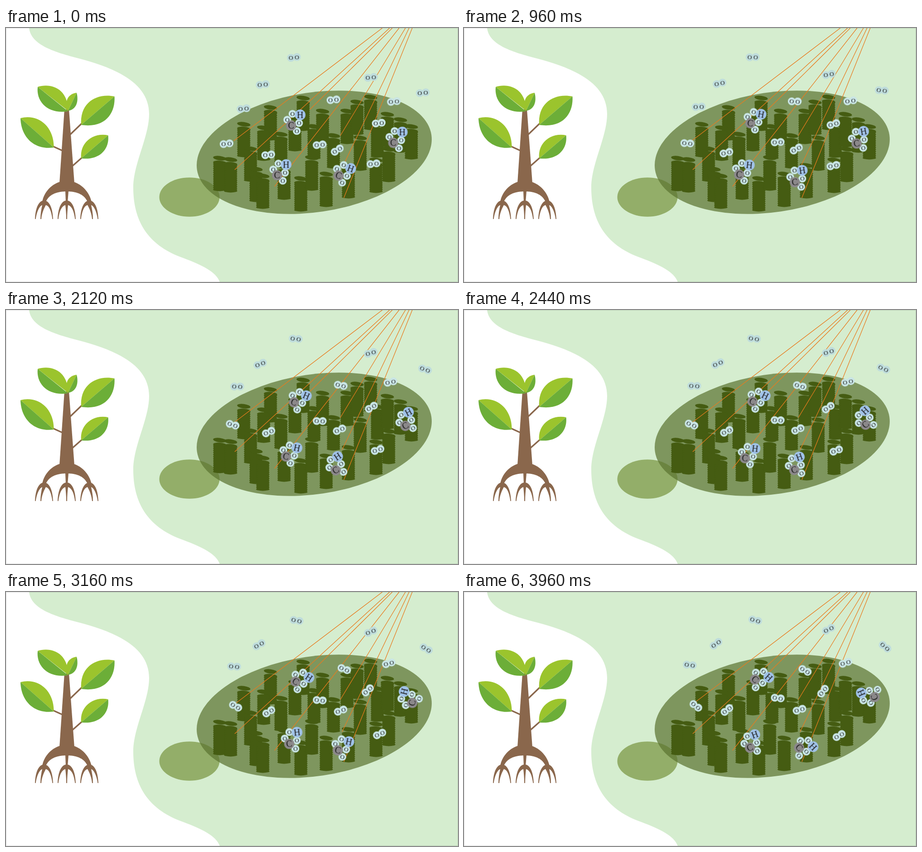
These frames come from a looping animation (998x561 px, 4 s). An HTML page:

```html
<!DOCTYPE html>
<html lang="en">
<head>
<meta charset="utf-8">
<title>Photosynthesis</title>
<style>
html, body { margin: 0; width: 100%; height: 100%; overflow: hidden; background: #d5edcf; }
svg { display: block; width: 100%; height: 100%; }
text { font-family: "Liberation Serif", "Times New Roman", serif; text-anchor: middle; fill: #1d1d1d; }
.light { fill: #9bc42d; }
.dark { fill: #6cae38; }
.wood { fill: #8a674c; }
.twig { stroke: #8a674c; stroke-width: 3.4; }
.rays { stroke: #e87b1e; stroke-width: 1.25; }
.drift { animation: drift 4s linear infinite; }
.bend { animation: bend 4s linear infinite; }
@keyframes drift {
  0% { transform: translate(var(--x0), var(--y0)) rotate(var(--r0)); }
  99%, 100% { transform: translate(var(--x1), var(--y1)) rotate(var(--r1)); }
}
@keyframes bend {
  0% { transform: translate(var(--x0), var(--y0)) rotate(var(--r0)); }
  50% { transform: translate(var(--x1), var(--y1)) rotate(var(--r1)); }
  99%, 100% { transform: translate(var(--x2), var(--y2)) rotate(var(--r2)); }
}
</style>
</head>
<body>
<svg viewBox="0 0 998 561" preserveAspectRatio="none">
  <defs>
    <g id="granum" fill="#455c12"></g>
    <path id="sideRoot" d="M64 422C65 398 72 381 84 381S103 398 104 422H102.400C100 405 96 393 88 391C83 400 79 410 78 422H76C76 410 78 400 80 391C73 394 68 406 65.600 422Z"/>
  </defs>
  <rect width="998" height="561" fill="#d5edcf"/>
  <path fill="#fff" d="M0 0H51C55 38 110 54 160 67C240 88 316 120 316 190C316 240 281 300 281 352C281 425 312 478 386 506C430 522 464 538 472 561H0Z"/>

  <path class="twig" d="M142 235L167 211M147 304.500L168 286M104 261.500L126 271.500"/>
  <g class="wood">
    <path d="M129 180H139L151 343H118Z"/>
    <path d="M118 340C100 346 84 362 80 384H88C95 368 110 362 131 361L132 385H136L138 361C158 362 173 368 180 384H189C184 362 168 346 150 340Z"/>
    <use href="#sideRoot"/>
    <use href="#sideRoot" transform="matrix(-1 0 0 1 268 0)"/>
    <path d="M114 422C115 398 122 381 134 381S153 398 154 422H152.400C150 405 146 394 137 391C136 400 135 410 135 422H133C133 410 132 400 131 391C122 394 118 405 115.600 422Z"/>
  </g>
  <path class="light" d="M70 130C100 121 137 134 137 183Z"/>
  <path class="dark" d="M70 130C66 164 94 191 137 184Z"/>
  <path class="light" d="M156 143C140 145 127 158 137 183Z"/>
  <path class="dark" d="M156 143C161 163 155 180 137 183Z"/>
  <path class="light" d="M239.500 151C200 143 162 165 166 214Z"/>
  <path class="dark" d="M239.500 151C242 187 220 222 166 214Z"/>
  <path class="light" d="M225.500 237C194 230 162 252 166 288Z"/>
  <path class="dark" d="M225.500 237C229 267 207 293 166 288Z"/>
  <path class="light" d="M32 199C70 189 106 216 105.500 264Z"/>
  <path class="dark" d="M32 199C33 242 63 270 105.500 264Z"/>

  <ellipse cx="405" cy="373.500" rx="66.500" ry="43.200" fill="#93ae69"/>
  <ellipse rx="261.600" ry="132.200" transform="translate(680.500 274.500) rotate(-8.440)" fill="#5a722f" opacity=".7"/>
  <g id="grana"></g>
  <path class="rays" d="M831 0L503 249M847 0L505 313M853 0L671 180M868 0L593 350M882 0L738 238M890 0L742 309M897 0L746 375"/>
  <g id="molecules"></g>
  <rect x=".5" y=".5" width="997" height="560" fill="none" stroke="#000" stroke-opacity=".13"/>
</svg>
<script>
const el = id => document.getElementById(id);

// One stack of discs, its top edge at y = 0
let discs = '<ellipse rx="14.700" ry="4.800" transform="translate(0 5.500) rotate(8)"/>' +
  '<ellipse rx="14.700" ry="4.600" transform="translate(0 15.500) rotate(4)"/>' +
  '<rect x="-13.600" y="16" width="27.200" height="59"/>';
for (let i = 0; i < 13; i++) discs += `<ellipse cy="${18.500 + i * 4.700}" rx="14.800" ry="3.500"/>`;
el("granum").innerHTML = discs;

const stacks = [
  [472, 282], [496, 285], [525, 207], [540, 261], [552, 306], [567, 321], [584, 170], [569, 215],
  [607, 229], [614, 301], [651, 327], [638, 194], [656, 149], [675, 281], [680, 212], [699, 178],
  [707, 317], [723, 232], [753, 178], [756, 298], [775, 158], [782, 237], [805, 147], [817, 286],
  [820, 208], [845, 262], [842, 185], [871, 197], [895, 212]
];
el("grana").innerHTML = stacks.map(([x, y]) => `<use href="#granum" x="${x}" y="${y}"/>`).join("");

const atom = (letter, x, y, r, size, fill) =>
  `<circle cx="${x}" cy="${y}" r="${r}" fill="${fill}"/>` +
  `<text x="${x}" y="${y + size * 0.33}" font-size="${size}">${letter}</text>`;
const oxygen = (x, y, fill = "#c9e5e5") => atom("O", x, y, 8.600, 13.500, fill);

const pair = fill => oxygen(-6.600, 0.900, fill) + oxygen(6.600, -0.900, fill);
const cluster = oxygen(-16, -5.500) + oxygen(-4.500, -18.500) + oxygen(10, 2) + oxygen(5, 19.500) +
  atom("H", 12.500, -16.100, 11.800, 20, "#a0c2e8") + atom("C", -7.500, 7.500, 11.200, 20, "#8b888a");

// Poses are [x, y, degrees]
function moving(shape, ...poses) {
  const vars = poses.map(([x, y, r], i) => `--x${i}:${x}px;--y${i}:${y}px;--r${i}:${r}deg`).join(";");
  return `<g class="${poses.length > 2 ? "bend" : "drift"}" style="${vars}">${shape}</g>`;
}

const outside = pair("#bedcdc"), inside = pair();
el("molecules").innerHTML = [
  moving(outside, [635.700, 65, 0], [643.100, 62.300, 21]),
  moving(outside, [566.800, 124.800, 0], [556.500, 114.300, -30]),
  moving(outside, [524.500, 178, 0], [498.500, 161.200, 13]),
  moving(outside, [805.500, 109, 0], [805.100, 82.300, -21]),
  moving(outside, [920.200, 143, 0], [929.700, 120.800, 45]),
  moving(inside, [856.500, 162.300, 0], [842.300, 156.300, -12]),
  moving(inside, [723, 158.500, 0], [753, 173.200, 35]),
  moving(inside, [823, 209.900, 0], [792.600, 219, -46]),
  moving(inside, [487, 255.500, 0], [512, 251.500, 44]),
  moving(inside, [579, 280, 0], [580.600, 260.600, -32]),
  moving(inside, [692.500, 257.800, 0], [692.800, 234.200, 14]),
  moving(inside, [731.400, 269.600, -26], [740.700, 260, -11]),
  moving(inside, [811.500, 299.700, 0], [828.300, 317, -23]),
  moving(cluster, [637, 208, 0], [653, 192.600, 41]),
  moving(cluster, [606, 317.800, 0], [626.400, 316.700, 13.700], [635.800, 334.400, -20]),
  moving(cluster, [744, 321.400, 19.300], [729, 343.800, -38], [750.400, 344, 45.700]),
  moving(cluster, [862.500, 246, 0], [884.200, 247, -22], [896.900, 228.100, -113])
].join("");
</script>
</body>
</html>
```
